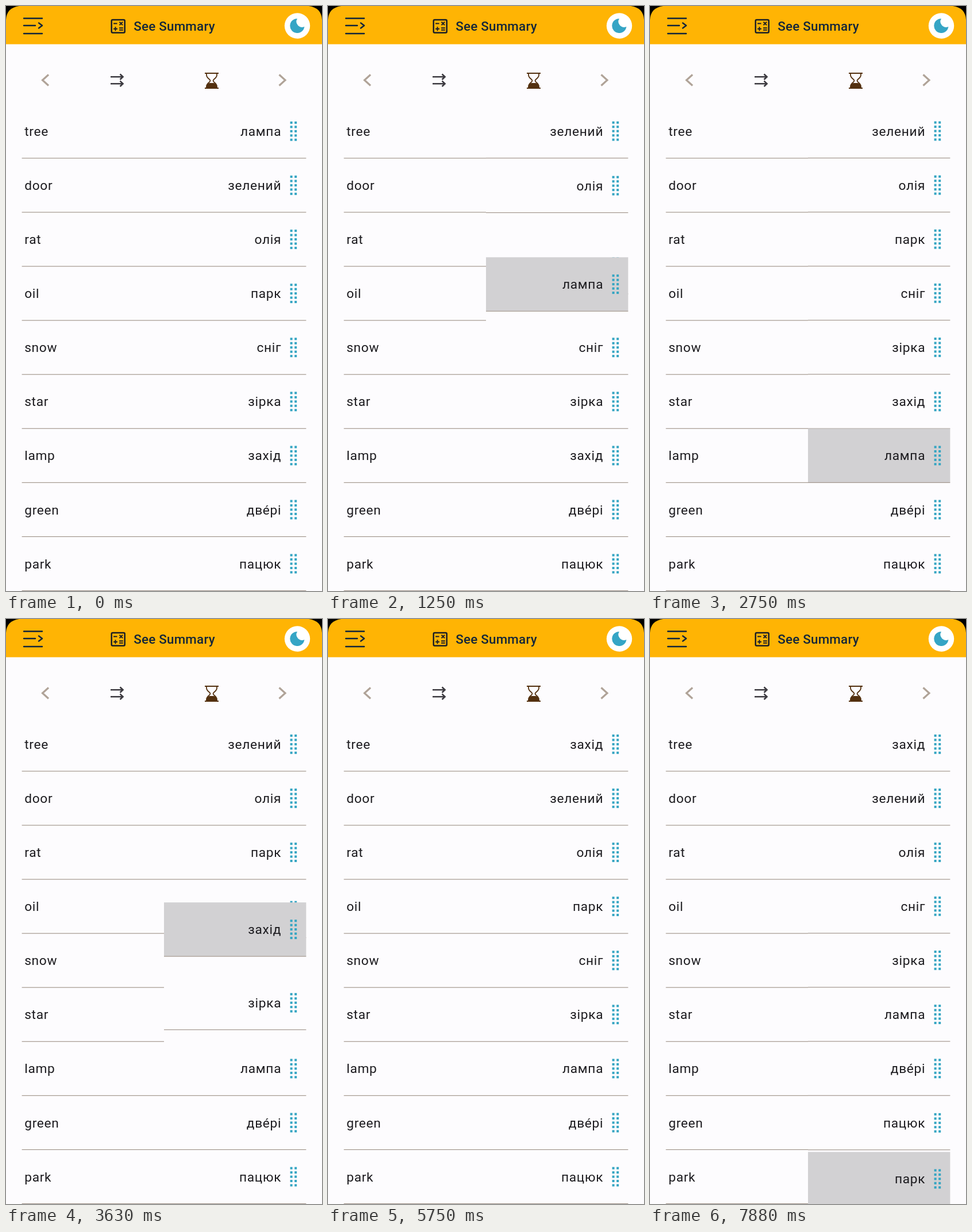
An HTML page that plays this animation: 550 px wide and 1018 px high, repeating every 8 s.

```html
<!DOCTYPE html>
<html lang="en">
<head>
<meta charset="utf-8">
<title>Match the words</title>
<style>
  html, body { margin: 0; width: 100%; height: 100%; overflow: hidden; background: #000; }
  svg { display: block; width: 100vw; height: 100vh; }
  text { font-family: Roboto, "Noto Sans", sans-serif; font-size: 22.7px; letter-spacing: .7px; fill: #1c1b1f; }
  .title { font-size: 22.4px; font-weight: 500; letter-spacing: .21px; fill: #14263a; }
  .end { text-anchor: end; }
  .line { fill: none; stroke-linecap: round; stroke-linejoin: round; }
</style>
</head>
<body>
<svg viewBox="0 0 550 1018">
  <rect width="550" height="1018" fill="#fdfcfe"/>
  <rect width="550" height="66.5" fill="#ffb404"/>
  <path d="M0 0H23Q1 3 0 24ZM550 0H527Q549 3 550 24Z"/>

  <path class="line" stroke="#10243a" stroke-width="2.4" d="M31 21.5H63M31 34H51M57 29.5L63 34L57 38.5M31 48H63"/>
  <g fill="none" stroke="#1a1f26" stroke-width="2.5">
    <rect x="183.7" y="24" width="23" height="22.6" rx="2"/>
    <path stroke-width="2" d="M187 30.5H193.5M197.5 27.8L203 33.2M203 27.8L197.5 33.2M187 39.8H194M190.5 36.3V43.3M197 38.3H203.8M197 41.8H203.8"/>
  </g>
  <text class="title" x="222.3" y="43">See Summary</text>
  <circle cx="507" cy="34.5" r="22.2" fill="#fff"/>
  <path fill="#35a5c5" d="M507 21.9A12.6 12.6 0 1 0 519.4 36A9.8 9.8 0 0 1 507 21.9Z"/>

  <g fill="none" stroke="#b0a398" stroke-width="3.2">
    <path d="M74 119.5L63.5 129L74 138.5"/>
    <path d="M475.5 119.5L486 129L475.5 138.5"/>
  </g>
  <path fill="none" stroke="#3d3b41" stroke-width="2.6" d="M182 123.3H203M198.5 118.5L203.5 123.3L198.5 128M182 135.2H203M198.5 130.4L203.5 135.2L198.5 140"/>
  <g stroke="#53300f" fill="none">
    <path stroke-width="2.2" d="M346 117H370M346 143H370"/>
    <path stroke-width="1.8" d="M349 117V120C349 126 355.5 127 355.5 130C355.5 133 349 134 349 140V143M367 117V120C367 126 360.5 127 360.5 130C360.5 133 367 134 367 140V143"/>
    <path fill="#53300f" stroke="none" d="M349 143V140Q350 135.500 354 134H362Q366 135.500 367 140V143Z"/>
  </g>
  <g id="left"></g>
  <g id="right"></g>
</svg>
<script>
const LOOP = 8000, STEP = 125;
const TOP = 171, PITCH = 94.08, SHIFT = 94.4, SETTLE = 130;
const LINE = '#9c8f84', TEAL = '#35a5c2';

const english = ['tree', 'door', 'rat', 'oil', 'snow', 'star', 'lamp', 'green', 'park'];
const ukrainian = ['лампа', 'зелений', 'олія', 'парк', 'сніг', 'зірка', 'захід', 'двéрі', 'пацюк'];

// Each path holds [time, row] points of the dragged card.
const drags = [
  { from: 0, to: 6, end: 2880, path: [[250, 0], [400, .4], [660, 1.5], [1000, 2.2], [1190, 2.55], [1250, 2.83], [1700, 4.6], [2100, 5.7], [2350, 6]] },
  { from: 5, to: 0, end: 4500, path: [[3250, 5], [3500, 4.3], [3900, 1.5], [4200, .2], [4350, 0]] },
  { from: 3, to: 8, end: LOOP, path: [[5900, 3], [6150, 3.15], [6290, 3.5], [6795, 4.5], [6875, 5.08], [7230, 7.5], [7450, 8], [7600, 8.04]] }
];

const rowTop = row => TOP + PITCH * row;
const start = drag => drag.path[0][0];

function rowAt(path, t) {
  const i = path.findIndex(p => p[0] > t);
  if (i < 0) return path[path.length - 1][1];
  if (i === 0) return path[0][1];
  const [[t0, a], [t1, b]] = [path[i - 1], path[i]];
  return a + (b - a) * (t - t0) / (t1 - t0);
}

// Time at which the card passes the middle of a neighbouring row.
function crossing({ path, from, to }, row) {
  const dir = Math.sign(to - from), edge = row - dir / 2;
  for (let i = 1; i < path.length; i++) {
    const [[t0, a], [t1, b]] = [path[i - 1], path[i]];
    if ((b - edge) * dir >= 0) return t0 + (t1 - t0) * (edge - a) / (b - a);
  }
  return Infinity;
}

function moved(list, { from, to }) {
  const copy = [...list];
  copy.splice(to, 0, copy.splice(from, 1)[0]);
  return copy;
}

const divider = (x, y) => `<rect x="${x}" y="${y}" width="247.4" height="1.1" fill="${LINE}"/>`;

document.getElementById('left').innerHTML = english.map((word, i) =>
  `<text x="32.2" y="${rowTop(i) + 55}">${word}</text>` + divider(27.6, rowTop(i) + 93.3)).join('');

let dots = '';
for (let i = 0; i < 10; i++) {
  dots += `<rect x="${494.6 + i % 2 * 7.6}" y="${30 + (i >> 1) * 7.45}" width="4" height="4" fill="${TEAL}"/>`;
}

const right = document.getElementById('right');
right.innerHTML = ukrainian.map(word =>
  `<g><rect x="275" width="247.4" height="93.6" fill="#d2d1d3"/>` +
  `<text class="end" x="479.2" y="55">${word}</text>${dots}${divider(275, 93.3)}</g>`).join('');
const cards = [...right.children];

function neighbourTop(drag, row, t) {
  const dir = Math.sign(drag.to - drag.from);
  const inWay = (row - drag.from) * dir > 0 && (drag.to - row) * dir >= 0;
  if (!inWay) return rowTop(row);
  const age = t - crossing(drag, row);
  return rowTop(row) - (age > 0 ? dir * SHIFT * (1 - Math.exp(-age / SETTLE)) : 0);
}

let held = null;
function render(t) {
  let order = cards, active = null;
  for (const drag of drags) {
    if (t >= drag.end) order = moved(order, drag);
    else if (t >= start(drag)) active = drag;
  }
  const lifted = active && order[active.from];
  order.forEach((card, row) => {
    const y = card === lifted ? rowTop(rowAt(active.path, t))
      : active ? neighbourTop(active, row, t) : rowTop(row);
    card.setAttribute('transform', `translate(0 ${y.toFixed(2)})`);
    card.firstChild.setAttribute('visibility', card === lifted ? 'visible' : 'hidden');
  });
  if (lifted && lifted !== held) right.append(lifted);
  held = lifted;
}

const begin = performance.now();
function tick() {
  const t = (performance.now() - begin) % LOOP;
  render(Math.floor(t / STEP) * STEP);
  requestAnimationFrame(tick);
}
tick();
</script>
</body>
</html>
```
